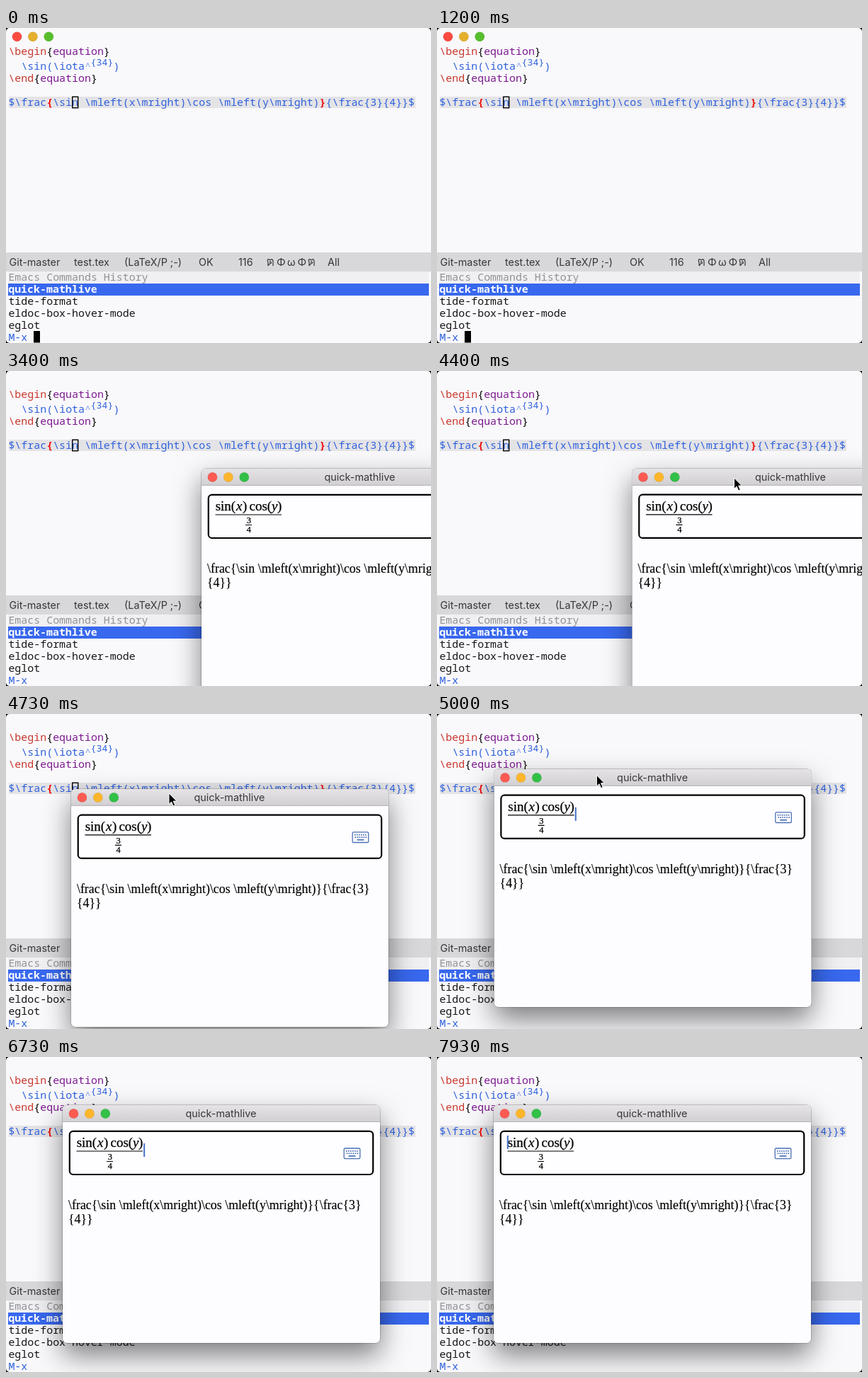
An HTML page for the animation above (8000 ms loop, 600x445 px).

```html
<!DOCTYPE html>
<html lang="en">
<head>
<meta charset="utf-8">
<title>quick-mathlive</title>
<style>
  html, body { margin: 0; width: 100%; height: 100%; overflow: hidden; background: #000; }
  #stage { position: relative; width: 600px; height: 445px; overflow: hidden; border-radius: 5px; }
  svg { position: absolute; left: 0; top: 0; display: block; overflow: visible; }
  text { white-space: pre; }
  .mono { font: 500 14.95px "Noto Sans Mono", "DejaVu Sans Mono", monospace; }
  .ui { font: 14.4px Inter, "Open Sans", sans-serif; fill: #373639; }
  .serif { font: 17.9px "Liberation Serif", serif; fill: #000; stroke: #000; stroke-width: .15; }
  .math { font: 19px "Liberation Serif", serif; fill: #000; stroke: #000; stroke-width: .25; }
  .small { font-size: 12.5px; }
  .it { font-style: italic; }
  .b { font-weight: 700; }
  .cmd { fill: #c8372d; }
  .env { fill: #7b1a8e; }
  .blue { fill: #2f62dd; }
  .brace { fill: #f01010; font-weight: 700; }
  .sup { font-size: 13.3px; }
  .caret-up { font-size: 12px; }
  #win {
    position: absolute; left: 0; top: 0; width: 448px; height: 336px;
    border-radius: 6px; background: #fdfcfe;
    box-shadow: 0 0 0 .5px rgba(0,0,0,.35), 0 17px 38px rgba(0,0,0,.5);
  }
</style>
</head>
<body>
<div id="stage">
  <svg width="600" height="445">
    <rect width="600" height="445" fill="#f9f8fb"/>
    <g id="mainLights"></g>
    <rect x="4" y="97" width="574" height="16" fill="#e4e3e6"/>
    <g class="mono">
      <text x="3.4" y="38"><tspan class="cmd">\begin</tspan>{<tspan class="env">equation</tspan>}</text>
      <text class="blue" x="21.4" y="59">\sin(\iota</text>
      <text class="blue caret-up" x="112" y="58" opacity=".65">^</text>
      <text class="blue sup" x="119.5" y="53">{34}</text>
      <text class="blue" x="151.5" y="59">)</text>
      <text x="3.4" y="76"><tspan class="cmd">\end</tspan>{<tspan class="env">equation</tspan>}</text>
      <text class="blue" x="3.4" y="109.5">$\frac<tspan class="brace">{</tspan>\sin \mleft(x\mright)\cos \mleft(y\mright)<tspan class="brace">}</tspan>{\frac{3}{4}}$</text>
    </g>
    <rect x="93.7" y="97.2" width="8" height="15.6" fill="none" stroke="#000" stroke-width="1.4"/>

    <rect y="317" width="600" height="27" fill="#d8d7da"/>
    <g class="ui" id="modeline"></g>
    <g id="face" fill="none" stroke="#373639" stroke-width="1.2"></g>

    <rect x="3" y="344" width="594" height="17" fill="#f0eff2"/>
    <rect x="3" y="361" width="594" height="17" fill="#3868ee"/>
    <g class="mono" fill="#161616">
      <text x="3.4" y="357" fill="#929194">Emacs Commands History</text>
      <text x="3.2" y="374" class="b" fill="#fff">quick-mathlive</text>
      <text x="3.4" y="391">tide-format</text>
      <text x="3.4" y="408">eldoc-box-hover-mode</text>
      <text x="3.4" y="425">eglot</text>
      <text x="3.4" y="441.5" class="blue">M-x</text>
    </g>
    <rect id="block" x="39" y="428" width="9" height="16.5" fill="#000"/>
  </svg>

  <div id="win">
    <svg width="448" height="336">
      <defs>
        <linearGradient id="bar" x2="0" y2="1">
          <stop stop-color="#e5e3e6"/><stop offset="1" stop-color="#d1cfd2"/>
        </linearGradient>
      </defs>
      <path d="M0 24V6Q0 0 6 0H442Q448 0 448 6V24Z" fill="url(#bar)"/>
      <path d="M0 23.5H448" stroke="#b4b2b5"/>
      <g id="winLights"></g>
      <text class="ui" x="223.5" y="17.3" text-anchor="middle">quick-mathlive</text>
      <rect x="9.8" y="36.8" width="428.4" height="61.2" rx="5" fill="#fefdff" stroke="#000" stroke-width="2.2"/>
      <g class="math">
        <text x="19.7" y="59">sin(</text>
        <text x="49" y="59" class="it">x</text>
        <text x="58" y="59">)</text>
        <text x="67.5" y="59">cos(</text>
        <text x="99" y="59" class="it">y</text>
        <text x="107" y="59">)</text>
        <g class="small" text-anchor="middle">
          <text x="66.8" y="77">3</text>
          <text x="66.8" y="90">4</text>
        </g>
        <path d="M19.5 65H113M62 79.5H71" stroke-width="1.1"/>
      </g>
      <g id="keys" fill="#4a70b4">
        <rect x="397.2" y="61" width="22.6" height="14.6" rx="1.6" fill="none" stroke="#4a70b4" stroke-width="1.3"/>
        <rect x="403.5" y="71" width="10" height="1.7"/>
      </g>
      <rect id="caret" width="2" height="19" fill="#4672c8"/>
      <g class="serif">
        <text x="8" y="147">\frac{\sin \mleft(x\mright)\cos \mleft(y\mright)}{\frac{3}</text>
        <text x="8" y="167">{4}}</text>
      </g>
    </svg>
  </div>

  <svg id="mouse" width="14" height="20">
    <path d="M0 0V15.6L3.6 12.2L6.2 18.2L8.8 17L6.2 11.2H11Z" fill="#000" stroke="#fff" stroke-width="1"/>
  </svg>
</div>
<script>
  const LOOP = 8000, OPEN = 1600, FOCUS = 2200, BLINK = 1050;
  const $ = id => document.getElementById(id);

  function add(parent, tag, attrs, text) {
    const el = document.createElementNS(parent.namespaceURI, tag);
    for (const k in attrs) el.setAttribute(k, attrs[k]);
    if (text) el.textContent = text;
    parent.appendChild(el);
  }

  function lights(parent, y, colours) {
    colours.forEach((fill, i) =>
      add(parent, "circle", { cx: 15.5 + i * 22.4, cy: y, r: 6.7, fill, stroke: "rgba(0,0,0,.12)", "stroke-width": .6 }));
  }
  lights($("mainLights"), 12.3, ["#fd4b40", "#e5af2c", "#57be2c"]);
  lights($("winLights"), 12, ["#fd5a52", "#fdb62c", "#33c047"]);

  [[4.5, "Git-master"], [96, "test.tex"], [167, "(LaTeX/P ;-)"], [272, "OK"],
   [328, "116"], [382, "Φ"], [397, "ω"], [411.5, "Φ"], [454, "All"]]
    .forEach(([x, s]) => add($("modeline"), "text", { x, y: 336 }, s));

  // Paw letters at both ends of the mode line face.
  for (const x of [369, 427])
    add($("face"), "path", {
      d: `M${x + 1} 336V331Q${x - 1} 327 ${x + 2} 326.6L${x + 4} 328L${x + 6} 326.6Q${x + 8} 327 ${x + 8} 330V336M${x + 1} 336L${x + 3.6} 332.6A1.3 1.3 0 1 0 ${x + 3} 331`
    });

  for (let row = 0; row < 2; row++)
    for (let i = 0; i < 6; i++)
      add($("keys"), "rect", { x: 400 + i * 3 + row * .6, y: 64 + row * 3.4, width: 1.7, height: 1.7 });

  // Rows of time, x, y.
  const winPath = [[4400, 276, 138], [4500, 222, 130], [4620, 128, 114], [4730, 92, 106],
                   [4880, 83, 90], [5030, 80, 75], [5180, 80, 68]];
  const mousePath = [[4200, 420, 151], [4400, 420, 151], [4500, 364, 142], [4620, 268, 122],
                     [4730, 230, 112], [4880, 227, 97], [5030, 225, 84], [5180, 225.5, 80.5]];

  function along(path, t) {
    const i = path.findIndex(p => p[0] > t);
    if (i === 0) return path[0].slice(1);
    if (i < 0) return path[path.length - 1].slice(1);
    const a = path[i - 1], b = path[i], k = (t - a[0]) / (b[0] - a[0]);
    return [a[1] + (b[1] - a[1]) * k, a[2] + (b[2] - a[2]) * k];
  }

  const show = (el, on) => { el.style.visibility = on ? "visible" : "hidden"; };
  const place = (el, [x, y]) => { el.style.transform = `translate(${x}px, ${y}px)`; };

  function draw(t) {
    show($("mainLights"), t < FOCUS);
    show($("block"), t < FOCUS);

    show($("win"), t >= OPEN);
    place($("win"), along(winPath, t));

    const blinkStart = t < 6400 ? 1620 : 6400;
    const lit = t >= 1620 && (t - blinkStart) % BLINK < BLINK / 2;
    const atStart = t >= 7450;
    $("caret").setAttribute("x", atStart ? 18.8 : 114.2);
    $("caret").setAttribute("y", atStart ? 43 : 54);
    show($("caret"), lit);

    show($("mouse"), t >= 4200 && t < 5800);
    place($("mouse"), along(mousePath, t));
  }

  const start = performance.now();
  function tick() {
    draw((performance.now() - start) % LOOP);
    requestAnimationFrame(tick);
  }
  draw(0);
  requestAnimationFrame(tick);
</script>
</body>
</html>
```
